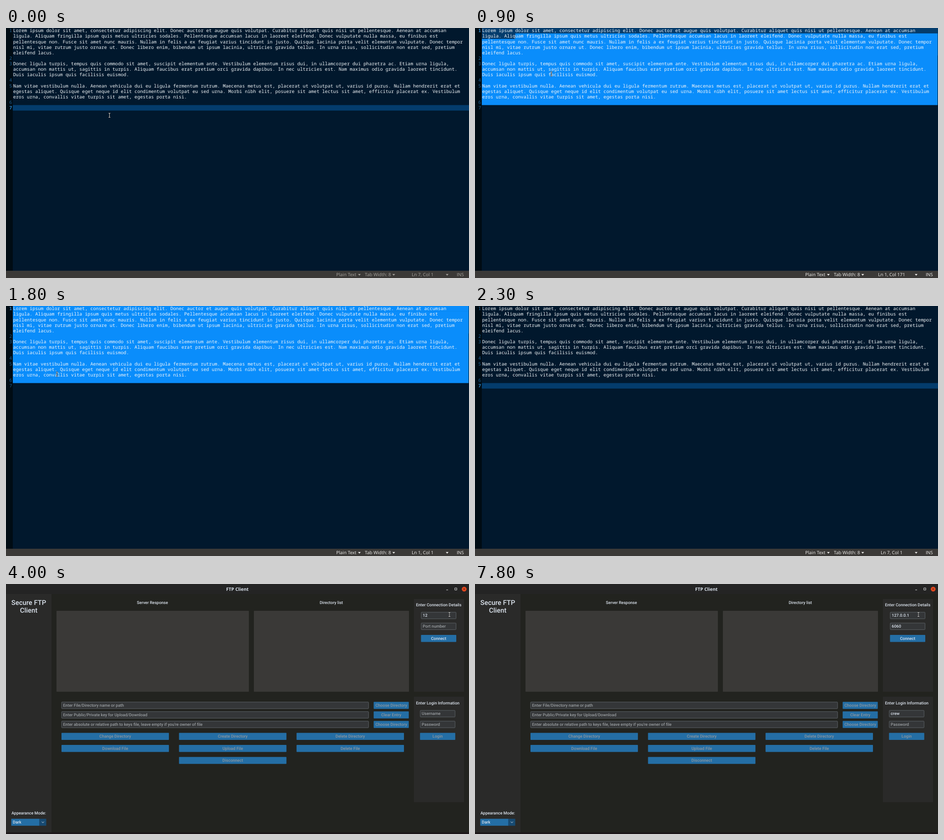
An HTML page that plays this animation: 1018x550 px, repeating every 8000 ms.

```html
<!DOCTYPE html>
<html lang="en">
<head>
<meta charset="utf-8">
<title>FTP Client</title>
<style>
  html, body { margin: 0; width: 100%; height: 100%; overflow: hidden; background: #01182d; }
  svg { display: block; width: 1018px; height: 550px; }
  text { text-rendering: geometricPrecision; white-space: pre; }
  .mono { font: 10.117px "Noto Sans Mono", monospace; }
  .bar { font: 10px "Open Sans", sans-serif; }
  .ui { font: 500 9.05px Roboto, sans-serif; }
  .heading { font: 500 14.8px Roboto, sans-serif; }
  .strong { font-weight: bold; }
</style>
</head>
<body>
<svg id="stage" viewBox="0 0 1018 550"></svg>
<script>
const LOOP = 8000;
const ROW = 12.125, CHAR = 6.07, LEFT = 15.7;
const LIGHT = '#dce4ee', MUTED = '#9a9ea1', BLUE = '#246ea5';

const rows = `Lorem ipsum dolor sit amet, consectetur adipiscing elit. Donec auctor et augue quis volutpat. Curabitur aliquet quis nisi ut pellentesque. Aenean at accumsan
ligula. Aliquam fringilla ipsum quis metus ultricies sodales. Pellentesque accumsan lacus in laoreet eleifend. Donec vulputate nulla massa, eu finibus est
pellentesque non. Fusce sit amet nunc mauris. Nullam in felis a ex feugiat varius tincidunt in justo. Quisque lacinia porta velit elementum vulputate. Donec tempor
nisl mi, vitae rutrum justo ornare ut. Donec libero enim, bibendum ut ipsum lacinia, ultricies gravida tellus. In urna risus, sollicitudin non erat sed, pretium
eleifend lacus.

Donec ligula turpis, tempus quis commodo sit amet, suscipit elementum ante. Vestibulum elementum risus dui, in ullamcorper dui pharetra ac. Etiam urna ligula,
accumsan non mattis ut, sagittis in turpis. Aliquam faucibus erat pretium orci gravida dapibus. In nec ultricies est. Nam maximus odio gravida laoreet tincidunt.
Duis iaculis ipsum quis facilisis euismod.

Nam vitae vestibulum nulla. Aenean vehicula dui eu ligula fermentum rutrum. Maecenas metus est, placerat ut volutpat ut, varius id purus. Nullam hendrerit erat et
egestas aliquet. Quisque eget neque id elit condimentum volutpat eu sed urna. Morbi nibh elit, posuere sit amet lectus sit amet, efficitur placerat ex. Vestibulum
eros urna, convallis vitae turpis sit amet, egestas porta nisi.

`.split('\n');
const lineStarts = [0, 5, 6, 9, 10, 13, 14];
const lastRow = 14;

// Tracks hold each value until the next time stamp.
const cursorTrack = [[0, lastRow, 0], [700, 11, 44], [800, 8, 25], [900, 1, 12], [1000, 0, 0], [1900, lastRow, 0]];
const pointerTrack = [
  [0, 'beam', 227.5, 192], [200, 'beam', 231.5, 192], [400, 'beam', 318, 193], [600, 'beam', 336, 180],
  [700, 'beam', 338, 172], [800, 'beam', 338, 160], [900, 'beam', 168, 101], [1000, 'beam', 24, 8],
  [1100, 'beam', 130.5, 92.5], [1500, 'beam', 129.5, 92.5], [1800, 'beam', 112, 150], [1900, 'beam', 92, 186],
  [2000, 'beam', 52, 280], [2100, 'beam', 22, 380], [2200, 'arrow', 5, 460], [2300, 'none', 0, 0],
  [2500, 'arrow', 8, 460], [2600, 'arrow', 84.5, 304.5], [2700, 'arrow', 350, 235], [2800, 'arrow', 606, 181],
  [3000, 'arrow', 770, 146], [3100, 'arrow', 905, 106], [3200, 'arrow', 1003, 74], [3300, 'beam', 975, 67],
];
const ipTrack = [[0, null], [3400, ''], [3600, '12'], [4200, '127'], [4700, '127.'], [4800, '127.0'],
  [5100, '127.0.'], [5300, '127.0.0'], [5400, '127.0.0.'], [5600, '127.0.0.1']];
const portTrack = [[0, null], [5700, ''], [6400, '6'], [6600, '60'], [6700, '6060']];
const loginTrack = [[0, null], [6900, ''], [7500, 'cr'], [7600, 'cre'], [7800, 'crew']];
const ipCaret = [[3400, 4000], [4200, 4900], [5300, 5700]];

const valueAt = (track, t) => track.findLast(key => key[0] <= t).slice(1);
const within = (spans, t) => spans.some(([from, to]) => t >= from && t < to);

const ruler = document.createElement('canvas').getContext('2d');
ruler.font = '500 90.5px Roboto, sans-serif';
const textWidth = s => ruler.measureText(s).width / 10;

const rect = (x, y, w, h, fill, extra = '') =>
  `<rect x="${x}" y="${y}" width="${w}" height="${h}" fill="${fill}" ${extra}/>`;
const label = (s, x, y, fill, cls = 'ui', anchor = 'start') =>
  `<text x="${x}" y="${y}" fill="${fill}" class="${cls}" text-anchor="${anchor}">${s}</text>`;
const path = (d, stroke, width = 1, fill = 'none') =>
  `<path d="${d}" stroke="${stroke}" stroke-width="${width}" fill="${fill}"/>`;

function pointer(t) {
  const [kind, x, y] = valueAt(pointerTrack, t);
  if (kind === 'beam') {
    const d = `M${x - 2} ${y - 4.5}h4M${x} ${y - 4.5}v9M${x - 2} ${y + 4.5}h4`;
    return path(d, '#1a1a1a', 2) + path(d, '#d0d0d0', 1);
  }
  if (kind === 'arrow') return path(`M${x} ${y}v8.5l2-1.8 1.4 3 1.3-.6-1.3-2.9h2.7z`, '#eee', .6, '#111');
  return '';
}

function editor(t) {
  const [row, col] = valueAt(cursorTrack, t);
  const line = lineStarts.findLastIndex(start => start <= row);
  const first = lineStarts[line], end = lineStarts[line + 1] ?? lastRow + 1;
  const column = rows.slice(first, row).reduce((sum, r) => sum + r.length + 1, col + 1);
  const barText = t < 600 ? '#a5a29d' : '#f2f1ef';
  const top = r => r * ROW - .2;

  let out = rect(0, 0, 1018, 550, '#01182d') + rect(0, 0, 15, 534, '#000c14');
  out += rect(15, top(first), 1003, (end - first) * ROW, '#043c6c');
  if (row < lastRow) {
    const x = col ? LEFT + col * CHAR : 15;
    out += rect(x, top(row), 1017 - x, ROW, '#0a8dfb');
    out += rect(15, top(row + 1), 1002, (lastRow - row - 1) * ROW, '#0a8dfb');
  }
  rows.forEach((s, i) => { out += label(s, LEFT, 9.3 + i * ROW, '#f4f6f8', 'mono'); });
  lineStarts.forEach((start, i) => {
    const current = i === line;
    out += label(i + 1, 13.3, 9.3 + start * ROW, current ? '#2b86c9' : '#1c5f94',
      current ? 'mono strong' : 'mono', 'end');
  });
  out += rect(0, 534, 1018, 16, '#3b3937');
  out += label('Plain Text', 726, 546, barText, 'bar') + label('Tab Width: 8', 789, 546, barText, 'bar');
  out += label(`Ln ${line + 1}, Col ${column}`, 916, 546, barText, 'bar', 'middle');
  out += label('INS', 991, 546, barText, 'bar');
  for (const x of [777, 852.5, 970]) out += path(`M${x - 3} 541.3h6l-3 3.4z`, 'none', 0, barText);
  return out;
}

const box = (x, y, w) => rect(x + .5, y + .5, w - 1, 14.5, '#343638', 'stroke="#5b6064" rx="1"');

function entry(x, y, w, hint, value = null, caret = false) {
  let out = box(x, y, w);
  out += label(value ?? hint, x + 3.8, y + 10.7, value === null ? MUTED : LIGHT);
  if (caret) out += rect(x + 3.6 + textWidth(value), y + 1.5, 1, 12, LIGHT);
  return out;
}

const button = (s, x, y, w, color = '#8f979d') =>
  rect(x, y, w, 15.4, BLUE, 'rx="1"') + label(s, x + w / 2, y + 10.7, color, 'ui', 'middle');

function client(t) {
  const center = (s, x, y, cls) => label(s, x, y, LIGHT, cls, 'middle');
  let out = rect(0, 0, 1018, 550, '#22231f') + rect(0, 0, 1018, 22, '#242424');
  out += rect(0, 22, 100, 525, '#2a2a29') + rect(0, 546.5, 1018, 3.5, '#1c1719');
  out += center('FTP Client', 508.7, 14.8, 'bar strong');
  out += path('M968 13h4', '#ddd') + path('M986.8 8.8h4.4v4.4h-4.4z', '#ddd');
  out += '<circle cx="1007.4" cy="11.2" r="5.3" fill="#e2481f"/>';
  out += path('M1005.6 9.4l3.6 3.6m0-3.6l-3.6 3.6', '#3a1a10', .9);

  out += center('Secure FTP', 50, 46, 'heading') + center('Client', 50, 63, 'heading');
  out += label('Appearance Mode:', 12, 506.5, LIGHT);
  out += rect(11.5, 516.5, 62, 15.3, BLUE) + rect(73, 516.5, 15.5, 15.3, '#174a72');
  out += label('Dark', 15, 527.3, LIGHT) + path('M78.5 522.8l2.6 2.6 2.6-2.6', LIGHT);

  out += center('Server Response', 322, 43.8, 'ui') + center('Directory list', 715.3, 43.8, 'ui');
  out += rect(111, 59, 423, 178, '#3a3937', 'rx="1"') + rect(545, 59, 341, 178, '#3a3937', 'rx="1"');
  out += rect(897, 33, 110, 204, '#2a2a29') + rect(897, 248, 110, 232, '#2a2a29');

  out += center('Enter Connection Details', 951.4, 49.2, 'ui');
  out += entry(912.5, 61.6, 77.5, 'IP address', valueAt(ipTrack, t)[0], within(ipCaret, t));
  out += entry(912.5, 85.4, 77.5, 'Port number', valueAt(portTrack, t)[0], within([[5800, 6400]], t));
  out += button('Connect', 912.5, 112, 77.5, LIGHT);
  out += center('Enter Login Information', 949.3, 264.8, 'ui');
  out += entry(910.3, 277.6, 77.5, 'Username', valueAt(loginTrack, t)[0], within([[6900, 7500]], t));
  out += entry(910.3, 301.2, 77.5, 'Password');
  out += button('Login', 910.3, 327.6, 77.5);

  [
    ['Enter File/Directory name or path', 'Choose Directory'],
    ['Enter Public/Private key for Upload/Download', 'Clear Entry'],
    ["Enter absolute or relative path to keys file, leave empty if you're owner of file", 'Choose Directory'],
  ].forEach(([hint, action], i) => {
    const y = 259.2 + i * 21;
    out += entry(121.7, y, 676, hint) + button(action, 808.4, y + .1, 77.2);
  });
  [
    ['Change Directory', 'Create Directory', 'Delete Directory'],
    ['Download File', 'Upload File', 'Delete File'],
    ['', 'Disconnect', ''],
  ].forEach((names, r) => names.forEach((name, c) => {
    if (name) out += button(name, 122 + c * 258.4, 327.6 + r * 26.4, 236.2);
  }));
  return out;
}

const stage = document.getElementById('stage');
let shown = '';
function draw(now) {
  const t = now % LOOP;
  const picture = (t < 2400 ? editor(t) : client(t)) + pointer(t);
  if (picture !== shown) stage.innerHTML = shown = picture;
  requestAnimationFrame(() => draw(performance.now() - start));
}
const start = performance.now();
draw(0);
</script>
</body>
</html>
```
